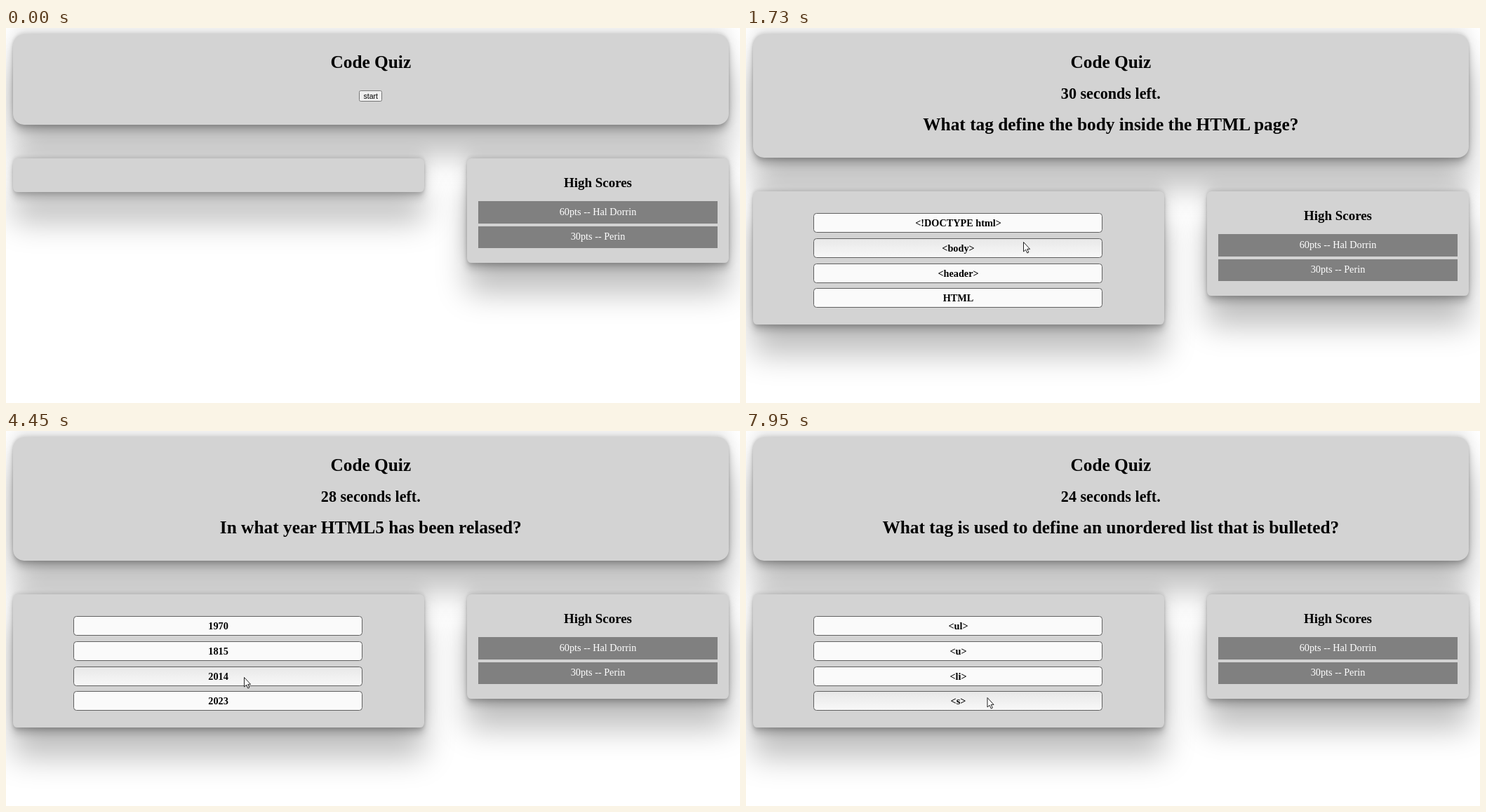
Write an HTML page that moves like this. It is 1046x535 px and loops after 8000 ms.

```html
<!DOCTYPE html>
<html lang="en">
<head>
<meta charset="utf-8">
<title>Code Quiz</title>
<style>
  html, body { margin: 0; width: 100%; height: 100%; overflow: hidden; background: #fff; }
  #stage { position: relative; width: 1046px; height: 535px; overflow: hidden; }
  .panel {
    position: absolute; background: #d3d3d3; border-radius: 6.3px;
    box-shadow: rgba(0,0,0,.25) 0 42.7px 43.5px, rgba(0,0,0,.12) 0 -9.5px 23.7px,
      rgba(0,0,0,.12) 0 3.2px 4.7px, rgba(0,0,0,.17) 0 9.5px 10.3px, rgba(0,0,0,.09) 0 -2.4px 4px;
  }
  #head { left: 9.5px; top: 9px; width: 1020.5px; border-radius: 15.8px; }
  #quiz { left: 9.5px; width: 586.2px; }
  #board { left: 657px; width: 373px; height: 149px; }
  svg { position: absolute; left: 0; top: 0; }
  text { text-anchor: middle; font-family: "Liberation Serif", "Times New Roman", serif; font-weight: bold; }
  .h1 { font-size: 25.35px; }
  .h2 { font-size: 22.12px; }
  .h3 { font-size: 18.96px; }
  .answer, .score { font-size: 14.25px; }
  .score { font-weight: normal; fill: #fff; }
  #start text { font: 10.5px "Liberation Sans", Arial, sans-serif; }
</style>
</head>
<body>
<div id="stage">
  <div class="panel" id="head"></div>
  <div class="panel" id="quiz"></div>
  <div class="panel" id="board"></div>
  <svg width="1046" height="535" viewBox="0 0 1046 535">
    <defs>
      <linearGradient id="hover" x2="0" y2="1">
        <stop stop-color="#e8e8e8"/><stop offset="1" stop-color="#f8f8f8"/>
      </linearGradient>
    </defs>
    <text class="h1" x="519.8" y="57">Code Quiz</text>
    <g id="start">
      <rect x="503.5" y="89.5" width="32" height="15" rx="2"/>
      <text x="519.8" y="101">start</text>
    </g>
    <text class="h2" id="timer" x="519.8" y="101"></text>
    <text class="h1" id="question" x="519.8" y="146"></text>
    <g id="answers"></g>
    <g id="scores">
      <text class="h3" x="843.5" y="227">High Scores</text>
      <path d="M673 247h341v32h-341zM673 283h341v31h-341z" fill="#808080"/>
      <text class="score" x="843.5" y="267">60pts -- Hal Dorrin</text>
      <text class="score" x="843.5" y="302">30pts -- Perin</text>
    </g>
    <g id="cursor">
      <circle id="press" cx="-1.5" r="10" fill="#ffff00" fill-opacity=".6"/>
      <path id="arrow" d="M.5 .5V14L3.6 11.2 5.8 16 7.9 15 5.7 10.4H9.6Z" fill="#fff" stroke="#222"/>
      <path id="beam" d="M-3 -5.5H-1L0 -4.5 1 -5.5H3M0 -4.5V5.5M-3 6.5H-1L0 5.5 1 6.5H3" fill="none" stroke="#333"/>
    </g>
  </svg>
</div>
<script>
const LOOP = 8000, TIMER_ON = 1730, SECOND = 1025, PRESS = 70;
const SHIFT = 47, PITCH = 35.6, ROW = { x: 96.5, width: 411, height: 27 };
const LIFT = 45; // how far each pointer move arcs upwards
const $ = id => document.getElementById(id);

// [time, question, ...answers]
const quiz = [
  [700, 'What tag define the body inside the HTML page?', '<!DOCTYPE html>', '<body>', '<header>', 'HTML'],
  [3270, 'In what year HTML5 has been relased?', '1970', '1815', '2014', '2023'],
  [5110, 'What noise is a drum?', 'Woof', 'Meow', 'RATATATATATA', 'Mooooooo'],
  [6080, 'What tag define the caption inside the HTML page?', '<head>', '<title>', '<label>', '<caption>'],
  [7950, 'What tag is used to define an unordered list that is bulleted?', '<ul>', '<u>', '<li>', '<s>']
];

// where the pointer rests: [arrive, leave, x, y]
const stops = [
  [0, 70, 640, 540],
  [600, 830, 524, 100],
  [1700, 1800, 395, 305],
  [2900, 3470, 332, 316],
  [4430, 4710, 339, 351],
  [5030, 5250, 368, 339],
  [5990, 6220, 350, 355],
  [6650, 6700, 522, 325],
  [7670, LOOP, 343.5, 380]
];

function pointer(t) {
  const i = stops.findIndex(s => t < s[1]);
  const [arrive, , x, y] = stops[i];
  if (t >= arrive) return { x, y };
  const [, leave, x0, y0] = stops[i - 1];
  const k = (t - leave) / (arrive - leave), ease = k * k * (3 - 2 * k);
  return { x: x0 + (x - x0) * ease, y: y0 + (y - y0) * ease - LIFT * Math.sin(Math.PI * ease) };
}

function setAttrs(el, attrs) {
  for (const name in attrs) el.setAttribute(name, attrs[name]);
  return el;
}
const add = (tag, attrs) =>
  $('answers').appendChild(setAttrs(document.createElementNS('http://www.w3.org/2000/svg', tag), attrs));

const rows = [0, 1, 2, 3].map(i => {
  const y = Math.floor(264.9 + i * PITCH) + 0.5;
  return {
    box: add('rect', { ...ROW, y, rx: 4, stroke: '#606060' }),
    label: add('text', { x: 302.5, y: y + 18.5, class: 'answer' })
  };
});

const show = (el, on) => el.style.display = on ? '' : 'none';
const setText = (el, s) => { if (el.textContent !== s) el.textContent = s; };
function inside(p, el) {
  const b = el.getBBox();
  return p.x >= b.x && p.x <= b.x + b.width && p.y >= b.y && p.y <= b.y + b.height;
}

function layout(open) {
  const dy = open ? SHIFT : 0;
  $('head').style.height = 129 + dy + 'px';
  $('quiz').style.top = $('board').style.top = 186 + dy + 'px';
  $('quiz').style.height = (open ? 190 : 48) + 'px';
  setAttrs($('scores'), { transform: `translate(0 ${dy})` });
  show($('answers'), open);
  show($('question'), open);
}

function draw(t) {
  const current = quiz.filter(q => q[0] <= t).pop();
  const timed = t >= TIMER_ON, p = pointer(t);
  layout(!!current);

  show($('start'), !timed);
  if (!timed) {
    const button = $('start').firstElementChild;
    setAttrs(button, inside(p, button)
      ? { fill: '#e5e5e5', stroke: '#4f4f4f' }
      : { fill: '#efefef', stroke: '#767676' });
  }

  show($('timer'), timed);
  setText($('timer'), `${30 - Math.floor((t - TIMER_ON) / SECOND)} seconds left.`);

  let overText = false;
  if (current) {
    const [, question, ...answers] = current;
    setText($('question'), question);
    rows.forEach(({ box, label }, i) => {
      setText(label, answers[i]);
      setAttrs(box, { fill: inside(p, box) ? 'url(#hover)' : '#fafafa' });
      overText = overText || inside(p, label);
    });
  }

  setAttrs($('cursor'), { transform: `translate(${p.x} ${p.y})` });
  show($('arrow'), !overText);
  show($('beam'), overText);
  show($('press'), quiz.some(([at]) => t >= at - PRESS && t < at));
}

const begin = performance.now();
function frame() {
  draw((performance.now() - begin) % LOOP);
  requestAnimationFrame(frame);
}
frame();
</script>
</body>
</html>
```
